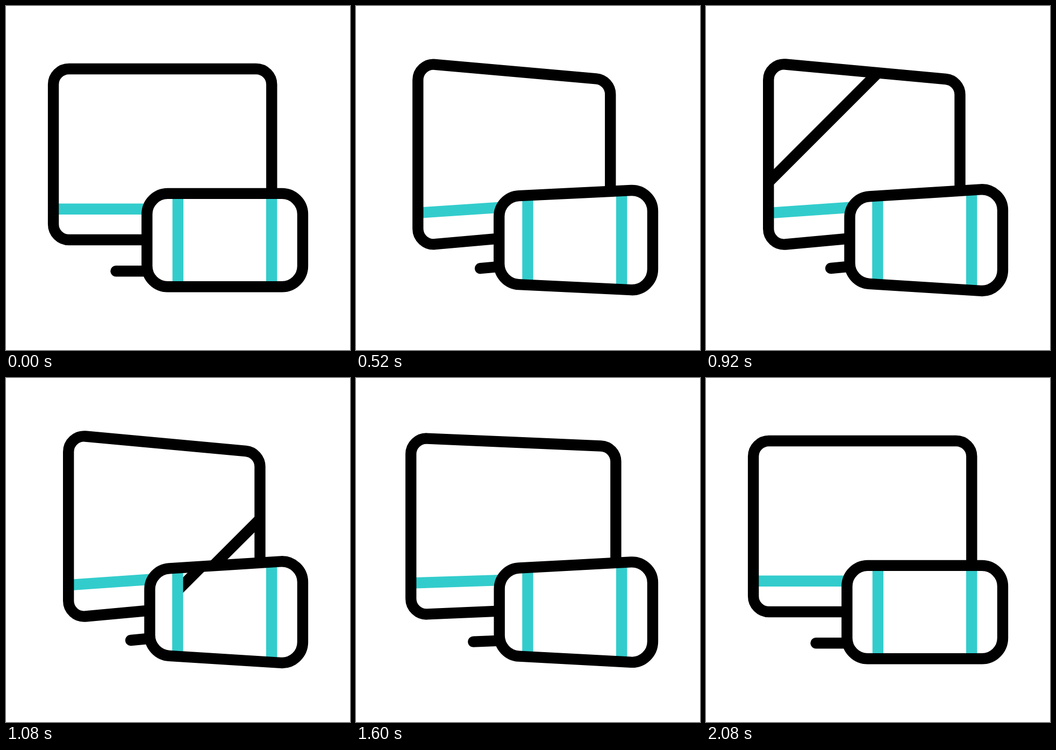
Write an HTML page with a canvas that moves like this. It is 640 px wide and 640 px high and loops after 2560 ms.

```html
<!DOCTYPE html>
<html>
<head>
<meta charset="utf-8">
<style>
  html, body { margin: 0; width: 100%; height: 100%; overflow: hidden; background: #fff; }
  canvas { display: block; width: 100vmin; height: 100vmin; }
</style>
</head>
<body>
<canvas width="640" height="640"></canvas>
<script>
const ctx = document.querySelector('canvas').getContext('2d');
const LOOP = 2560, STEP = 40, MOVE = 640;
const BLACK = '#000', CYAN = '#33cccc';

const mix = (a, b, k) => a + (b - a) * k;

// Eased progress of a move that begins at the given time
function ease(t, start) {
  const p = Math.min(1, Math.max(0, (t - start) / MOVE));
  return p < 0.5 ? (2 * p) ** 2.7 / 2 : 1 - (2 - 2 * p) ** 2.7 / 2;
}

// Tilt away, then back
const tilt = (t, delay) => ease(t, delay) - ease(t, 1280 + delay);

// Rounded trapezium, symmetric about the line y = mid
function panel(left, right, mid, leftHalf, rightHalf, r) {
  const pts = [[left, mid - leftHalf], [right, mid - rightHalf],
               [right, mid + rightHalf], [left, mid + leftHalf]];
  const path = new Path2D();
  path.moveTo((left + right) / 2, mid - (leftHalf + rightHalf) / 2);
  for (let i = 1; i <= 4; i++) path.arcTo(...pts[i % 4], ...pts[(i + 1) % 4], r);
  path.closePath();
  return path;
}

function line(color, x1, y1, x2, y2, cap = 'butt') {
  ctx.strokeStyle = color;
  ctx.lineCap = cap;
  ctx.beginPath();
  ctx.moveTo(x1, y1);
  ctx.lineTo(x2, y2);
  ctx.stroke();
}

function outline(path) {
  ctx.strokeStyle = BLACK;
  ctx.stroke(path);
}

// Diagonal stripe x + y = sum, sweeping across the clip
function shine(clip, t, start, from, to) {
  if (t <= start || t >= start + MOVE) return;
  const sum = mix(from, to, ease(t, start));
  ctx.save();
  ctx.clip(clip);
  line(BLACK, -100, sum + 100, sum + 100, -100);
  ctx.restore();
}

function monitor(t) {
  const k = tilt(t, 0);
  const body = panel(mix(88.1, 116.2, k), mix(494.3, 472.5, k), 276,
                     mix(159, 170.4, k), mix(159, 137.6, k), 29);
  const bar = [mix(88, 116, k), mix(377.7, 385.2, k), 300, mix(377.7, 372.5, k)];

  line(BLACK, mix(204.5, 232, k), mix(493.3, 488, k), 300, mix(493.3, 481.5, k), 'round');
  const screen = new Path2D();
  screen.moveTo(0, 0);
  screen.lineTo(640, 0);
  screen.lineTo(640, bar[3]);
  screen.lineTo(bar[2], bar[3]);
  screen.lineTo(bar[0], bar[1]);
  screen.lineTo(0, bar[1]);
  ctx.save();
  ctx.clip(screen);
  shine(body, t, 640, 245.5, 815);
  ctx.restore();
  line(CYAN, ...bar);
  outline(body);
}

function phone(t) {
  const k = tilt(t, 120);
  const leftHalf = mix(86.7, 79, k), rightHalf = mix(86.7, 96.8, k), mid = 435.6;
  const body = panel(mix(262.3, 267.4, k), 552, mid, leftHalf, rightHalf, 38.6);
  ctx.fillStyle = '#fff';
  ctx.fill(body);

  const barX = [mix(319.9, 319.4, k), 494.2];
  ctx.save();
  ctx.clip(body);
  const screen = new Path2D();
  screen.rect(barX[0], 300, barX[1] - barX[0], 280);
  shine(screen, t, 880, 663, 1030);
  for (const x of barX) line(CYAN, x, 300, x, 580);
  ctx.restore();
  outline(body);
}

function draw(now) {
  const t = Math.floor((now % LOOP) / STEP) * STEP;
  ctx.fillStyle = '#fff';
  ctx.fillRect(0, 0, 640, 640);
  ctx.lineWidth = 20.4;
  monitor(t);
  phone(t);
}

const begin = performance.now();
function frame() {
  draw(performance.now() - begin);
  requestAnimationFrame(frame);
}
frame();
</script>
</body>
</html>
```
